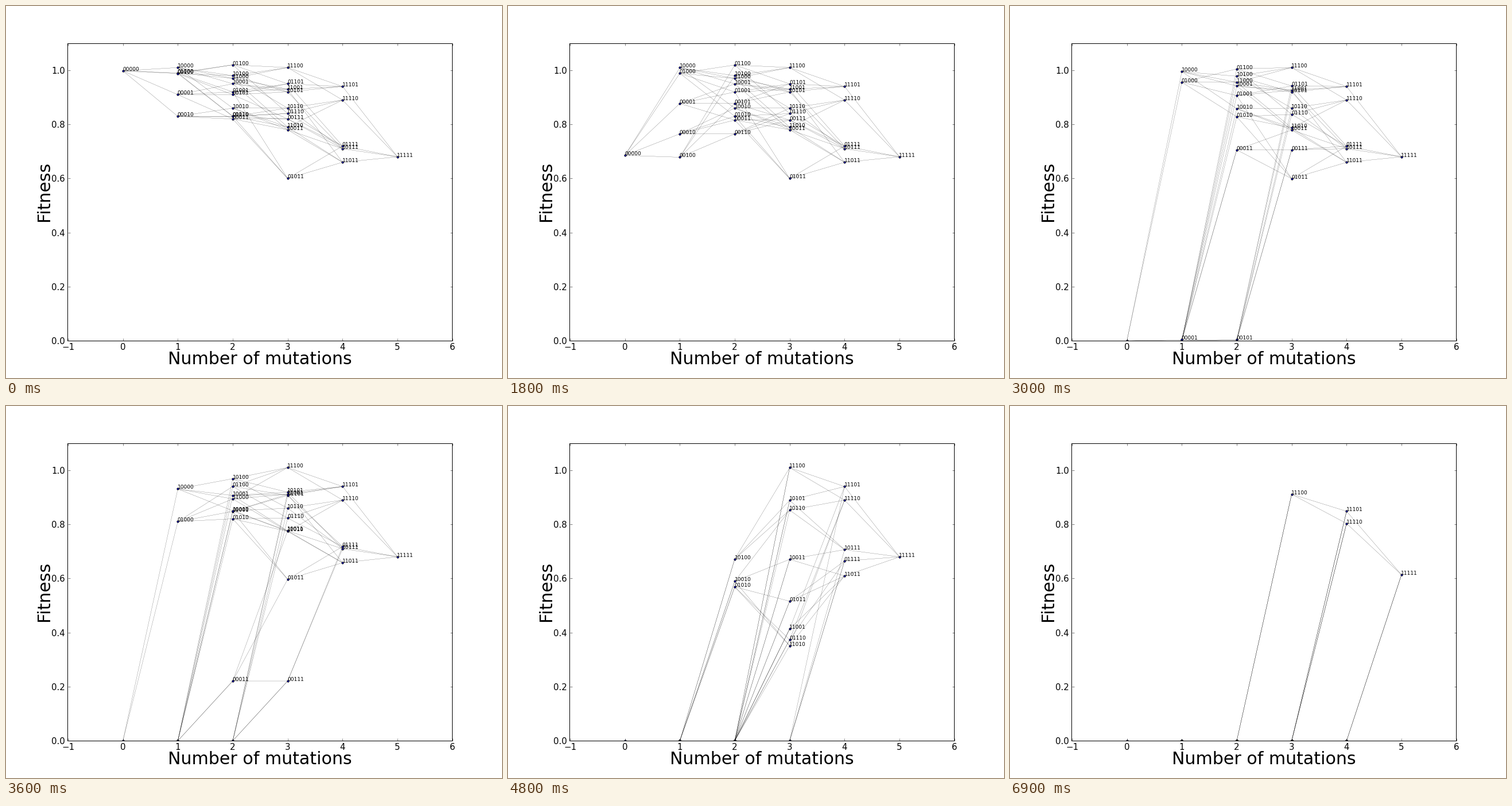
Write a matplotlib script that moves like this. It is 864 px wide and 648 px high and loops after 7200 ms.

```python
import itertools

import matplotlib.pyplot as plt
import numpy as np
from matplotlib.animation import FuncAnimation
from matplotlib.collections import LineCollection
from matplotlib.patches import Rectangle

W, H = 864, 648
FRAMES, INTERVAL = 24, 300
DOSE_STEP = 10 ** 0.36  # dose factor from one frame to the next

# Fitness without drug
BASE = {
    "00000": 1.00,
    "10000": 1.01, "01000": 0.99, "00100": 0.99, "00010": 0.83, "00001": 0.91,
    "01100": 1.02, "10100": 0.98, "11000": 0.97, "10001": 0.95, "01001": 0.92,
    "00101": 0.91, "10010": 0.86, "01010": 0.83, "00110": 0.83, "00011": 0.82,
    "11100": 1.01, "01101": 0.95, "11001": 0.93, "10101": 0.92, "10110": 0.86,
    "01110": 0.84, "00111": 0.82, "11010": 0.79, "10011": 0.78, "01011": 0.60,
    "11101": 0.94, "11110": 0.89, "01111": 0.72, "10111": 0.71, "11011": 0.66,
    "11111": 0.68,
}

# Step at which the dose becomes lethal, and the genotypes sharing it
LETHAL = {
    7.395: "00000 00100",
    9.073: "00010 00110",
    10.005: "00001 00101",
    12.379: "00011 00111",
    14.057: "01000",
    15.073: "10000 01100 11000 01001",
    15.732: "10001 01101",
    16.710: "11001 01110 11010",
    17.396: "10100 10010 01010",
    18.370: "10011 01011",
    19.098: "01111 11011",
    20.078: "10101",
    21.747: "10110",
    22.440: "10111",
    25.808: "11100 11101 11110 11111",
}

genes = list(BASE)
limit_of = {g: t for t, group in LETHAL.items() for g in group.split()}
base = np.array([BASE[g] for g in genes])
limit = np.array([limit_of[g] for g in genes])
count = np.array([g.count("1") for g in genes])


def differ_by_one(a, b):
    return sum(p != q for p, q in zip(a, b)) == 1


edges = np.array([(i, j) for i, j in itertools.combinations(range(len(genes)), 2)
                  if differ_by_one(genes[i], genes[j])])


def fitness(step):
    return base * np.clip(1 - DOSE_STEP ** (step - limit), 0, None)


plt.rcParams["font.family"] = "DejaVu Sans"
fig = plt.figure(figsize=(W / 72, H / 72), dpi=72, facecolor="white")
ax = fig.add_axes([0.125, 0.1, 0.775, 0.8])
ax.set_xlim(-1, 6)
ax.set_ylim(0, 1.1)
ax.set_xticks(range(-1, 7))
ax.set_yticks(np.arange(6) * 0.2)
ax.tick_params(direction="in", top=True, right=True, length=4, width=0.5,
               pad=4, labelsize=15)
ax.tick_params(axis="y", pad=5)

# Frame on whole pixels
ax.spines[:].set_visible(False)
fig.add_artist(Rectangle((107.5 / W, 64.5 / H), 670 / W, 518 / H, fill=False,
                         linewidth=1, edgecolor="black", snap=False))

fig.text(442.7 / W, 1 - 624 / H, "Number of mutations", size=30,
         ha="center", va="baseline")
fig.text(74.5 / W, 325 / H, "Fitness", size=30, rotation=90,
         rotation_mode="anchor", ha="center", va="baseline")

links = LineCollection([], colors="black", linewidths=0.2, zorder=1, snap=False)
ax.add_collection(links, autolim=False)
dots = ax.scatter(count, base, s=10, c="blue", edgecolors="black",
                  linewidths=1, zorder=2)
labels = [ax.annotate(g, (x, y), xytext=(-0.5, 0), textcoords="offset points",
                      size=9, annotation_clip=False)
          for x, y, g in zip(count, base, genes)]


def draw(step):
    points = np.column_stack([count, fitness(step)])
    links.set_segments(points[edges])
    dots.set_offsets(points)
    for label, (x, y) in zip(labels, points):
        label.xy = (x, y)
        label.set_visible(y > 0)
    return [links, dots, *labels]


anim = FuncAnimation(fig, draw, frames=FRAMES, interval=INTERVAL,
                     init_func=lambda: draw(0), repeat=True, repeat_delay=0)
plt.show()
```
